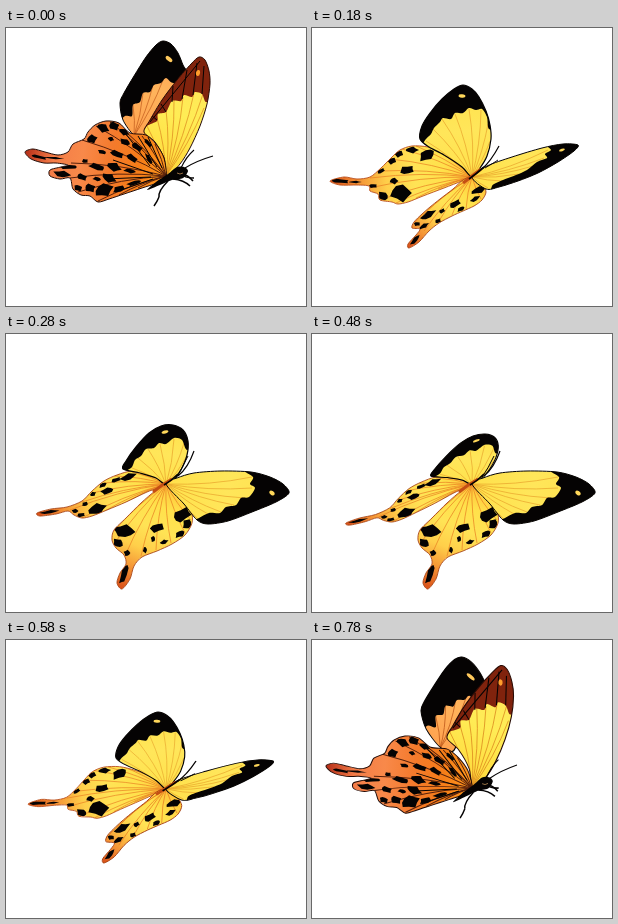
An HTML page with a canvas for the animation above (0.88 s loop, 300 px wide and 278 px high).

```html
<!DOCTYPE html>
<html lang="en">
<head>
<meta charset="utf-8">
<title>Butterfly</title>
<style>
html, body { margin: 0; width: 100%; height: 100%; overflow: hidden; background: #fff; }
canvas { display: block; }
</style>
</head>
<body>
<canvas id="stage" width="300" height="278"></canvas>
<script>
const g = document.getElementById('stage').getContext('2d');
const INK = '#050303', YELLOW = '#ffe14b', ORANGE = '#f0791f';
const points = text => text.trim().split(/\s+/).map(p => p.split(',').map(Number));

// Closed Catmull-Rom curve
function curve(text) {
  const p = points(text), n = p.length, path = new Path2D();
  const at = i => p[(i + n) % n];
  path.moveTo(...p[0]);
  for (let i = 0; i < n; i++) {
    const [a, b, c, d] = [at(i - 1), at(i), at(i + 1), at(i + 2)];
    path.bezierCurveTo(
      b[0] + (c[0] - a[0]) / 7, b[1] + (c[1] - a[1]) / 7,
      c[0] - (d[0] - b[0]) / 7, c[1] - (d[1] - b[1]) / 7, c[0], c[1]);
  }
  path.closePath();
  return path;
}

// Irregular dark patch; spec is x,y,rx,ry,degrees
function blob([x, y, rx, ry, turn = 0]) {
  const path = new Path2D(), r = turn * Math.PI / 180;
  for (let i = 0; i < 9; i++) {
    const a = i * Math.PI * 2 / 9, k = 1 + 0.2 * Math.sin(i * 2.7 + x + y);
    const u = Math.cos(a) * rx * k, v = Math.sin(a) * ry * k;
    path.lineTo(x + u * Math.cos(r) - v * Math.sin(r), y + u * Math.sin(r) + v * Math.cos(r));
  }
  path.closePath();
  return path;
}

function frameOf([o, a, b]) {
  return new DOMMatrix([a[0] - o[0], a[1] - o[1], b[0] - o[0], b[1] - o[1], o[0], o[1]]);
}

// Keeps the first anchor still and moves the other two
function fit(anchors, move) {
  const from = points(anchors);
  return frameOf([from[0], ...points(move)]).multiply(frameOf(from).inverse());
}

function wing(spec) {
  const [root, tip] = points(spec.anchors);
  const fill = g.createLinearGradient(...root, ...tip);
  spec.colors.forEach((c, i) => fill.addColorStop(i / (spec.colors.length - 1), c));
  return {
    ...spec, fill, root: points(spec.root || spec.anchors)[0],
    outline: curve(spec.shape),
    bands: (spec.bands || []).map(curve),
    ends: points(spec.veins),
    patches: points(spec.spots || '').filter(s => s.length > 1).map(blob)
  };
}

function drawWing(w) {
  g.save();
  g.clip(w.outline);
  g.fillStyle = w.fill;
  g.fill(w.outline);
  g.strokeStyle = w.veinColor || '#e58a1c';
  g.lineWidth = w.veinWidth || 0.7;
  for (const [x, y] of w.ends) {
    const [a, b] = w.root;
    g.beginPath();
    g.moveTo(a, b);
    g.quadraticCurveTo((a + x) / 2 + (b - y) * 0.06, (b + y) / 2 + (x - a) * 0.06, x, y);
    g.stroke();
  }
  g.fillStyle = w.bandColor || INK;
  w.bands.forEach(b => g.fill(b));
  if (w.ribs) {
    g.strokeStyle = INK;
    g.lineWidth = 1;
    for (const [x1, y1, x2, y2] of points(w.ribs)) line(x1, y1, x2, y2);
  }
  g.fillStyle = INK;
  w.patches.forEach(p => g.fill(p));
  if (w.eye) {
    const [x, y, rx, ry, turn] = w.eye;
    g.fillStyle = w.eyeColor || '#ffd75a';
    g.beginPath();
    g.ellipse(x, y, rx, ry, turn, 0, 7);
    g.fill();
  }
  g.restore();
  g.strokeStyle = w.edge || INK;
  g.lineWidth = w.edgeWidth || 1;
  g.stroke(w.outline);
}

function line(x1, y1, x2, y2) {
  g.beginPath();
  g.moveTo(x1, y1);
  g.lineTo(x2, y2);
  g.stroke();
}

const yellowWing = [YELLOW, '#ffe65a', YELLOW];
const tailedWing = ['#ffc43a', YELLOW, '#ffe355', '#ffcf4a', '#f49335', '#d94f18'];

const raised = {
  farFore: wing({
    anchors: '128,106 157,13 114,75', colors: ['#ffa24f', '#ffb45c', '#ff9c4d'],
    shape: '128,107 117,92 114,75 118,65 128,48 140,29 150,17 157,13 165,16 172,25 177,37 181,46 168,60 150,85 140,108',
    bands: ['110,93 119,88 126,88 127,77 134,74 137,65 144,64 148,57 155,55 160,50 168,55 188,48 178,5 150,5 105,60'],
    veins: '127,77 137,65 147,57 157,52', root: '128,108', veinColor: '#c05a1c',
    eye: [163, 31, 4, 2, 0.7], eyeColor: '#ffc95c'
  }),
  nearFore: wing({
    anchors: '160,148 196,30 138,104', colors: ['#ffd739', '#ffec55', '#ffe55a'],
    shape: '161,148 158,130 149,114 138,104 144,92 156,72 171,52 185,36 193,29 199,32 203,43 204,56 201,76 194,98 184,120 174,136',
    bands: ['136,106 141,98 151,93 152,86 160,84 166,73 175,73 178,67 186,69 189,64 196,66 200,74 208,65 207,25 190,22 160,55 136,92'],
    bandColor: '#80230d',
    ribs: '151,92,146,88 160,84,155,76 166,74,167,58 176,71,181,42 187,67,191,35 196,66,198,38 144,94,194,33',
    veins: '141,98 151,90 160,82 168,72 177,69 188,65 197,66 198,80', veinColor: '#db861d',
    eye: [192, 45, 2, 3, 0.2], eyeColor: '#ff9d2c', edge: '#260a05'
  }),
  hind: wing({
    anchors: '160,148 19,125 100,93', colors: ['#ff9a1e', '#f57d18', '#f47a2c', '#f8894a', '#f47d48', '#b52e18'],
    shape: `160,149 158,130 150,116 140,107 124,105 113,95 100,93 89,97 82,104 78,111 67,116 62,124
      52,127 39,124 27,121 19,124 25,131 38,135 50,135 62,137 55,139 44,142 44,148 54,151 64,150
      67,161 75,167 84,168 92,174 103,171 118,166 136,160 151,155`,
    veins: '90,98 104,94 120,104 136,108 149,116 76,112 65,135 64,150 72,164 92,173 113,167 132,160',
    veinColor: '#57200b', veinWidth: 1,
    ribs: '120,106,144,138 132,108,151,139 142,109,156,140 107,132,147,146 99,151,145,149 109,164,147,151',
    spots: `97,100,6,4,25 108,98,5,4,20 118,104,5,3,25 86,111,5,4,-15 105,111,3,2,20 119,114,5,3,25
      131,119,6,3,35 142,115,5,2,50 96,124,4,2,15 111,126,7,3,20 126,130,6,3,35 143,131,6,2,60
      79,133,3,2,0 91,139,8,3,15 108,139,7,4,20 124,143,6,2,10 76,149,5,3,20 91,151,4,2,10
      103,150,7,4,25 98,162,9,6,-20 84,160,5,4,15 72,160,4,3,20 113,161,6,3,-20 128,155,7,2,-15
      62,139,9,2,0 56,146,8,3,8 33,129,8,1.5,12 48,130,9,1,5`,
    edge: '#240a04'
  })
};

const spread = {
  farFore: wing({
    anchors: '160,149 151,57 108,110', colors: yellowWing,
    shape: '160,149 150,139 132,127 117,119 108,111 110,98 118,85 130,71 142,61 151,57 160,61 167,69 174,83 178,97 179,111 175,128 168,140',
    bands: ['106,120 114,111 119,106 122,100 128,94 131,90 139,91 143,85 151,85 157,80 164,82 170,81 175,89 177,101 188,100 170,50 130,50 100,95'],
    veins: '114,113 121,101 130,91 143,86 157,81 169,82 176,96 178,113', veinColor: '#e8a32b',
    eye: [150, 68, 3.5, 1.7, 0.1], edgeWidth: 1.2
  }),
  farHind: wing({
    anchors: '160,149 18,153 100,119', colors: tailedWing,
    shape: `160,149 150,136 132,125 116,119 100,118 88,122 79,130 69,140 58,149 45,151 32,149 18,153
      28,157 45,157 57,158 58,163 66,166 68,172 80,174 86,176 96,174 111,168 132,160 150,153`,
    veins: '90,121 104,118 119,119 78,131 69,143 58,150 57,160 68,172 84,175 104,170 126,161', veinColor: '#e87d21',
    spots: `100,122,6,3,0 115,127,8,5,-30 87,126,4,3,-20 80,133,4,3,-20 95,142,7,4,-10 69,143,4,2,-30
      89,165,10,8,0 71,168,5,4,30 61,158,4,2,0 82,153,4,3,0 28,153,9,2,5 43,154,6,1,0`,
    edge: '#b94a14', edgeWidth: 0.9
  }),
  nearHind: wing({
    anchors: '160,149 97,220 172,170', colors: tailedWing,
    shape: `160,149 170,156 174,164 170,172 162,178 151,183 140,188 127,195 117,203 107,214 97,220
      96,216 104,207 108,201 100,200 102,194 110,186 118,179 128,171 141,161 151,152`,
    veins: '103,194 111,187 112,203 127,193 140,187 154,181 169,171', veinColor: '#e87d21',
    spots: `116,187,8,3,-30 143,176,6,3,-30 167,162,8,3,-20 163,171,5,2,-30 149,181,4,2,-30
      130,183,3,2,-30 112,198,5,2,-30 105,196,3,2,0 126,193,3,2,-20 103,212,6,2,-48`,
    edge: '#a94413', edgeWidth: 0.9
  }),
  nearFore: wing({
    anchors: '160,149 267,117 205,154', colors: yellowWing,
    shape: '160,149 175,138 200,129 230,120 251,116 266,117 262,123 246,134 226,145 206,153 187,159 174,161',
    bands: ['236,116 239,122 233,126 235,130 225,134 215,142 204,147 191,152 180,158 184,169 235,150 275,123 268,110'],
    veins: '236,122 232,130 221,138 207,146 191,153 176,160', veinColor: '#e8a32b',
    eye: [250, 122, 3, 1.2, -0.3]
  })
};

const lowered = {
  farFore: wing({
    anchors: '160,151 167,91 117,135', colors: yellowWing,
    shape: '160,151 150,144 134,139 117,135 120,127 130,113 143,99 155,92 167,91 177,96 182,107 181,121 175,136 168,146',
    bands: ['112,139 125,134 129,126 135,122 140,115 148,114 153,109 160,110 168,104 176,106 181,116 192,108 180,85 145,85 110,125'],
    veins: '126,134 132,124 142,115 154,110 168,105 178,109 181,122', veinColor: '#e8a32b',
    eye: [159, 98, 3.5, 1.5, -0.3], edgeWidth: 1.2
  }),
  farHind: wing({
    anchors: '160,150 31,179 125,138', colors: tailedWing,
    shape: `160,150 146,142 127,137 111,141 98,147 86,157 76,167 61,173 45,175 31,179 34,182 50,180
      62,177 68,181 76,184 86,182 101,176 120,168 141,158`,
    veins: '126,138 109,142 98,149 86,159 76,168 64,176 76,184 97,178 119,169', veinColor: '#e87d21',
    spots: `122,143,8,3,-20 110,146,5,2,-20 101,157,6,3,-15 97,151,4,2,-30 87,160,3,2,-30
      91,175,9,5,-20 75,181,4,2,-10 69,177,3,2,0 79,170,3,2,-20 43,178,9,1.5,-8`,
    edge: '#a94413', edgeWidth: 0.9
  }),
  nearHind: wing({
    anchors: '160,150 116,255 186,185', colors: tailedWing,
    shape: `160,150 175,163 185,177 186,189 179,201 166,210 151,217 136,223 128,232 124,245 116,255
      111,249 114,239 120,230 118,221 110,214 106,206 108,196 120,184 135,169 149,157`,
    veins: '108,197 108,210 119,222 135,222 150,216 165,209 179,199 185,186', veinColor: '#e87d21',
    spots: `118,197,10,6,5 112,209,5,4,30 151,194,7,4,-15 176,181,9,6,-30 181,190,4,5,20
      174,200,5,3,-30 158,208,4,2,-20 147,205,2,3,0 121,219,3,3,0 139,216,2,3,0 118,240,3,10,18`,
    edge: '#a94413', edgeWidth: 0.9
  }),
  nearFore: wing({
    anchors: '160,150 283,160 200,190', colors: yellowWing,
    shape: '160,150 171,144 188,139 215,137 245,138 264,143 277,150 283,159 270,168 246,178 222,187 202,190 191,186 178,170',
    bands: ['236,134 247,143 244,150 249,154 243,163 235,164 230,171 220,173 214,179 203,179 193,184 186,188 200,200 245,190 295,165 280,135'],
    veins: '246,143 246,154 239,164 228,171 215,178 202,180 191,184', veinColor: '#e8a32b',
    eye: [266, 159, 3, 2, 0.6]
  })
};

function stroke(text, width, color = INK) {
  const [start, bend, end] = points(text);
  g.strokeStyle = color;
  g.lineWidth = width;
  g.beginPath();
  g.moveTo(...start);
  g.quadraticCurveTo(...bend, ...end);
  g.stroke();
}

const torso = curve('141,162 150,154 162,146 171,139 178,139 182,143 177,150 166,152 154,157');

raised.body = {
  anchors: '143,160 207,128 150,178',
  paint() {
    g.fillStyle = INK;
    g.fill(torso);
    ['175,140 180,129 188,122', '179,140 190,133 207,128'].forEach(s => stroke(s, 1.1));
    ['162,153 152,163 153,169', '153,169 151,174 148,178', '167,151 178,152 184,158',
      '176,146 182,147 187,153', '178,148 181,150 188,150'].forEach(s => stroke(s, 1.5));
    stroke('171,145 174,147 177,145', 0.8, '#b98a55');
  }
};
spread.body = {
  anchors: '160,149 187,118 178,138',
  paint() {
    stroke('151,155 160,148 169,141', 3, '#c44e14');
    stroke('157,151 164,146 172,139', 1.7);
    stroke('170,141 179,133 187,118', 1.2);
    stroke('173,140 180,136 186,132', 0.9);
  }
};
lowered.body = {
  anchors: '160,150 188,117 178,138',
  paint() {
    stroke('147,158 157,150 166,145', 3, '#c44e14');
    stroke('158,151 165,147 172,140', 1.6);
    stroke('169,145 177,133 182,122', 1);
    stroke('172,142 182,134 188,117', 1.2);
  }
};

// Per step: artwork plus new places for the two moving anchors of each part
const steps = [
  [raised, {}],
  [spread, {
    farFore: '151,31 107,93', farHind: '13,137 96,104',
    nearHind: '76,198 169,168', nearFore: '241,66 196,128'
  }],
  [spread, {}],
  [lowered, {}],
  [lowered, {
    farFore: '174,106 120,145', farHind: '37,195 121,147',
    nearHind: '121,265 187,190', nearFore: '286,170 201,196'
  }],
  [lowered, { farFore: '173,100 119,142', farHind: '34,189 123,144' }],
  [spread, {
    farFore: '152,72 110,117', farHind: '22,164 98,128',
    nearHind: '98,223 174,172', nearFore: '268,121 207,154', body: '190,121 180,139'
  }],
  [spread, {
    farFore: '150,39 107,98', farHind: '14,144 96,110',
    nearHind: '82,203 170,168', nearFore: '248,77 198,134'
  }],
  [raised, {
    farFore: '150,17 109,71', nearFore: '192,27 135,98',
    hind: '14,127 93,96', body: '205,125 150,178'
  }]
];
const order = ['farHind', 'farFore', 'nearHind', 'nearFore', 'hind', 'body'];

function draw(index) {
  const [art, moves] = steps[index];
  g.fillStyle = '#fff';
  g.fillRect(0, 0, 300, 278);
  for (const name of order) {
    const part = art[name];
    if (!part) continue;
    g.save();
    if (moves[name]) g.setTransform(fit(part.anchors, moves[name]));
    part.paint ? part.paint() : drawWing(part);
    g.restore();
  }
}

// The first step lasts 80 ms, the others 100 ms
const stepAt = ms => Math.floor((ms % 880 + 20) / 100);
const start = performance.now();
let shown = 0;
function tick() {
  const index = stepAt(performance.now() - start);
  if (index !== shown) draw(shown = index);
  requestAnimationFrame(tick);
}
draw(0);
requestAnimationFrame(tick);
</script>
</body>
</html>
```
